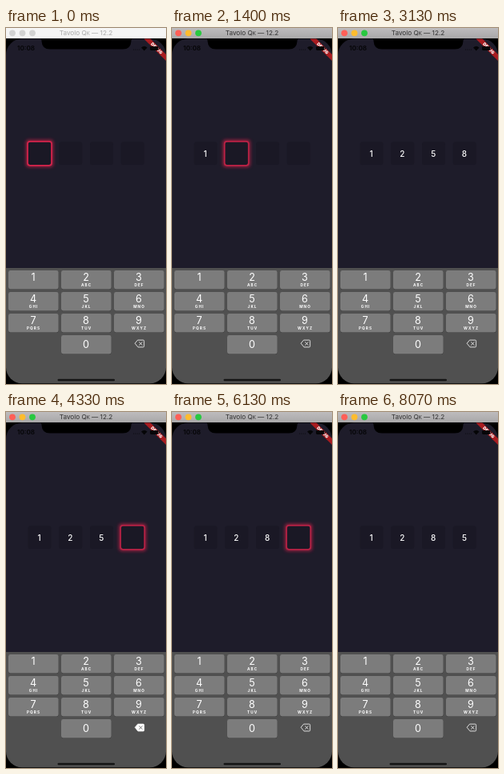
These frames come from a looping animation (200x445 px, 8140 ms). An HTML page:

```html
<!DOCTYPE html>
<html lang="en">
<head>
<meta charset="utf-8">
<title>PIN entry</title>
<style>
  html, body { margin: 0; width: 100%; height: 100%; overflow: hidden; background: #000; }
  svg { display: block; width: 200px; height: 445px; font-family: Inter, Roboto, sans-serif; }
  text { text-anchor: middle; }
</style>
</head>
<body>
<svg id="stage" viewBox="0 0 200 445" xmlns="http://www.w3.org/2000/svg">
  <defs>
    <linearGradient id="bar" x2="0" y2="1">
      <stop offset="0" stop-color="#bdbbbd"/><stop offset="1" stop-color="#a9a8a9"/>
    </linearGradient>
    <filter id="blur" x="-50%" y="-50%" width="200%" height="200%">
      <feGaussianBlur stdDeviation="2.2"/>
    </filter>
    <clipPath id="screen"><rect y="13.6" width="200" height="430.6" rx="20"/></clipPath>
  </defs>
  <rect width="200" height="445" fill="#000"/>
  <g clip-path="url(#screen)">
    <rect y="13" width="200" height="288" fill="#1e1c2a"/>
    <g id="boxes"></g>
    <rect y="300" width="200" height="145" fill="#505050"/>
    <g id="keys"></g>
    <g id="erase" transform="translate(0 -.5)" stroke-linecap="round" stroke-linejoin="round" stroke-width=".8">
      <path id="eraseBody" d="M165 390.6H171.4Q172.6 390.6 172.6 391.8V398.2Q172.6 399.4 171.4 399.4H165L161.4 395Z" stroke="#fff"/>
      <path id="eraseCross" d="M166.6 393.2L170.2 396.8M170.2 393.2L166.6 396.8"/>
    </g>
    <rect x="64.5" y="438.8" width="71.5" height="2.4" rx="1.2" fill="#141414"/>
    <g transform="translate(200 13.8) rotate(45)">
      <rect x="-19.4" y="13.5" width="38.8" height="5.8" fill="#a81c20"/>
      <text y="18.2" font-size="5.2" font-weight="900" fill="#fff">DEBUG</text>
    </g>
    <path d="M42 13Q44.5 13 44.5 16.5Q45 26.6 55 26.6H146Q156 26.6 156.5 16.5Q156.5 13 159 13Z" fill="#000"/>
    <g fill="#050507">
      <text x="25" y="28.2" font-size="8.2" font-weight="600">10:08</text>
      <circle cx="159.5" cy="27" r=".5"/><circle cx="161.8" cy="27" r=".5"/>
      <circle cx="164.1" cy="27" r=".5"/><circle cx="166.4" cy="27" r=".5"/>
      <path d="M169 24.4Q172.8 21 176.6 24.4L172.8 28.4Z"/>
      <rect x="180" y="23" width="10.5" height="5" rx="1.4"/>
      <rect x="191" y="24.6" width=".8" height="1.8" rx=".4"/>
    </g>
  </g>
  <rect id="title" width="200" height="13"/>
  <g id="lights"></g>
  <text id="name" x="100" y="9.3" font-size="8.2">Tavolo Q<tspan font-size="6">K</tspan> — 12.2</text>
</svg>
<script>
const LOOP = 8140;
const ACTIVE_AT = 70;
const BOX_X = [42, 80.7, 119.5, 158.2];
const LIGHTS = ['#ff5f57', '#febc2e', '#28c840'];
const LETTERS = ['', '', 'ABC', 'DEF', 'GHI', 'JKL', 'MNO', 'PQRS', 'TUV', 'WXYZ'];
const GLOW = .62;

// [key, pressed, released]; digits enter on release, erasing acts on press
const TAPS = [
  ['1', 70, 530], ['2', 1870, 2070], ['5', 2200, 2330], ['8', 3000, 3130],
  ['<', 4270, 4470], ['<', 5270, 5400], ['8', 5930, 6130], ['5', 6870, 7070]
];
// spans in which the glow swells once
const SWELLS = [[1270, 2070], [5270, 6070]];

const $ = id => document.getElementById(id);

function add(parent, tag, attrs, text) {
  const el = document.createElementNS('http://www.w3.org/2000/svg', tag);
  for (const k in attrs) el.setAttribute(k, attrs[k]);
  if (text) el.textContent = text;
  parent.appendChild(el);
  return el;
}

const lights = LIGHTS.map((c, i) => add($('lights'), 'circle', { cx: 8 + 12.5 * i, cy: 6.3, r: 3.9 }));

const boxes = BOX_X.map(cx => {
  const rect = (w, attrs) => add($('boxes'), 'rect',
    { x: cx - w / 2, y: 156.8 - w / 2, width: w, height: w, rx: 3, ...attrs });
  return {
    glow: rect(33.5, { fill: '#d0204a', filter: 'url(#blur)', opacity: .8 }),
    face: rect(29, { fill: '#1a1825' }),
    edge: rect(30, { fill: 'none', 'stroke-width': 1.7 }),
    digit: add($('boxes'), 'text', { x: cx - .3, y: 160.6, 'font-size': 10, 'font-weight': 500, fill: '#fff' })
  };
});

const keys = {};
for (const n of [1, 2, 3, 4, 5, 6, 7, 8, 9, 0]) {
  const col = n ? (n - 1) % 3 : 1;
  const row = n ? Math.floor((n - 1) / 3) : 3;
  const x = 3 + 66 * col, y = 303 + 27 * row;
  const g = $('keys');
  add(g, 'rect', { x, y: y + .6, width: 62.6, height: 23.4, rx: 2.4, fill: '#363636' });
  keys[n] = add(g, 'rect', { x, y, width: 62.6, height: 23.4, rx: 2.4 });
  add(g, 'text', { x: x + 31, y: y + (n ? 12.6 : 16), 'font-size': 12.6, 'font-weight': 400, fill: '#fff' }, String(n));
  if (LETTERS[n]) {
    add(g, 'text', { x: x + 31.6, y: y + 19.7, 'font-size': 4.7, 'font-weight': 700, 'letter-spacing': 1.1, fill: '#fff' }, LETTERS[n]);
  }
}

function stateAt(t) {
  let pin = '', held = null;
  for (const [key, down, up] of TAPS) {
    if (t >= down && t < up) held = key;
    if (key === '<') {
      if (t >= down) pin = pin.slice(0, -1);
    } else if (t >= up) pin += key;
  }
  return { pin, held };
}

function glowAt(t) {
  if (t < ACTIVE_AT) return .95;
  for (const [a, b] of SWELLS) {
    if (t > a && t < b) return GLOW + .12 * Math.sin(Math.PI * (t - a) / (b - a));
  }
  return GLOW;
}

function draw(t) {
  const { pin, held } = stateAt(t);
  const active = t >= ACTIVE_AT;
  const glow = glowAt(t);

  $('title').setAttribute('fill', active ? 'url(#bar)' : '#f5f5f5');
  $('name').setAttribute('fill', active ? '#2e2e2e' : '#a8a8a8');
  lights.forEach((el, i) => el.setAttribute('fill', active ? LIGHTS[i] : '#d2d2d2'));

  boxes.forEach((b, i) => {
    const on = i === pin.length;
    b.glow.setAttribute('visibility', on ? 'visible' : 'hidden');
    b.edge.setAttribute('stroke', on ? `rgba(218,36,76,${glow})` : 'none');
    b.digit.textContent = pin[i] || '';
  });

  for (const k in keys) keys[k].setAttribute('fill', k === held ? '#5a5a5a' : '#7c7c7c');
  const erasing = held === '<';
  $('eraseBody').setAttribute('fill', erasing ? '#fff' : 'none');
  $('eraseCross').setAttribute('stroke', erasing ? '#505050' : '#fff');
}

const start = performance.now();
function tick() {
  draw((performance.now() - start) % LOOP);
  requestAnimationFrame(tick);
}
tick();
</script>
</body>
</html>
```
